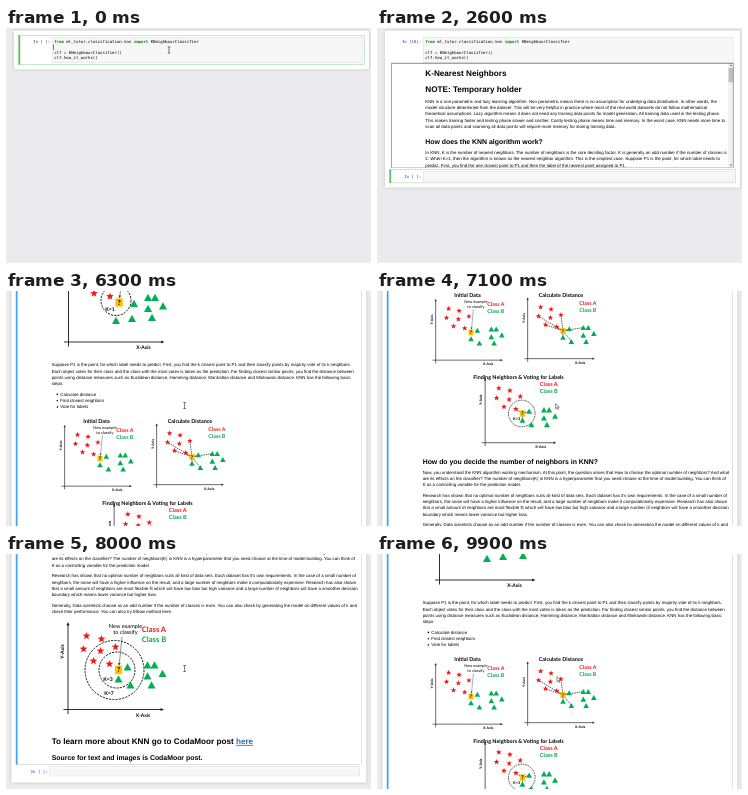
An HTML page for the animation above (10000 ms loop, 365x235 px).

```html
<!DOCTYPE html>
<html lang="en">
<head>
<meta charset="utf-8">
<title>Notebook tutorial</title>
<style>
html, body { margin: 0; width: 100%; height: 100%; overflow: hidden; background: #ebeaed; }
svg { display: block; }
text { font: 4.39px "Liberation Sans", Arial, sans-serif; text-rendering: geometricPrecision; white-space: pre; }
.h1 { font-size: 8.16px; font-weight: bold; }
.h2 { font-size: 6.91px; font-weight: bold; }
.code { font: 4px "DejaVu Sans Mono", monospace; }
.prompt { text-anchor: end; fill: #303f9f; }
.keyword { fill: #008000; font-weight: bold; }
.operator { fill: #aa22ff; font-weight: bold; }
.link { fill: #296eaa; text-decoration: underline; }
.chart { font-family: Lato, sans-serif; text-anchor: middle; }
.bold { font-weight: bold; }
.page { fill: #fff; filter: drop-shadow(0 0 1.5px rgba(87, 87, 87, .3)); }
.input { fill: #f7f7f7; stroke: #cfcfcf; stroke-width: .35; }
</style>
</head>
<body>
<svg id="stage" width="365" height="235" viewBox="0 0 365 235"></svg>
<script>
const LEFT = 48.3, SHIFT = 2.65, LINE = 6.28;
const GREEN = '#66bb6a', BLUE = '#42a5f5', GRAY = '#ababab';

const text = (x, y, str, cls = '', extra = '') => `<text x="${x}" y="${y}" class="${cls}" ${extra}>${str}</text>`;
const rect = (x, y, w, h, extra) => `<rect x="${x}" y="${y}" width="${w}" height="${h}" ${extra}/>`;
const path = (d, extra) => `<path d="${d}" ${extra}/>`;
const para = (y, str) => str.split('\n').map((line, i) => text(LEFT, y + i * LINE, line)).join('');

const INTRO = `KNN is a non parametric and lazy learning algorithm. Non parametric means there is no assumption for underlying data distribution. In other words, the model
structure determined from the dataset. This will be very helpful in practice where most of the real world datasets do not follow mathematical theoretical
assumptions. Lazy algorithm means it does not need any training data points for model generation. All training data used in the testing phase. This makes
training faster and testing phase slower and costlier. Costly testing phase means time and memory. In the worst case, KNN needs more time to scan all data
points and scanning all data points will require more memory for storing training data.`;
const HOW = `In KNN, K is the number of nearest neighbors. The number of neighbors is the core deciding factor. K is generally an odd number if the number of classes is 2.
When K=1, then the algorithm is known as the nearest neighbor algorithm. This is the simplest case. Suppose P1 is the point, for which label needs to predict.
First, you find the one closest point to P1 and then the label of the nearest point assigned to P1.`;
const STEPS = `Suppose P1 is the point, for which label needs to predict. First, you find the k closest point to P1 and then classify points by majority vote of its k neighbors.
Each object votes for their class and the class with the most votes is taken as the prediction. For finding closest similar points, you find the distance between
points using distance measures such as Euclidean distance, Hamming distance, Manhattan distance and Minkowski distance. KNN has the following basic
steps:`;
const DECIDE = `Now, you understand the KNN algorithm working mechanism. At this point, the question arises that How to choose the optimal number of neighbors? And what
are its effects on the classifier? The number of neighbors(K) in KNN is a hyperparameter that you need choose at the time of model building. You can think of
K as a controlling variable for the prediction model.`;
const RESEARCH = `Research has shown that no optimal number of neighbors suits all kind of data sets. Each dataset has it's own requirements. In the case of a small number of
neighbors, the noise will have a higher influence on the result, and a large number of neighbors make it computationally expensive. Research has also shown
that a small amount of neighbors are most flexible fit which will have low bias but high variance and a large number of neighbors will have a smoother decision
boundary which means lower variance but higher bias.`;
const GENERALLY = `Generally, Data scientists choose as an odd number if the number of classes is even. You can also check by generating the model on different values of k and
check their performance. You can also try Elbow method here.`;

// Greedy wrap for the narrower scrolling output
const meter = document.createElement('canvas').getContext('2d');
meter.font = '100px "Liberation Sans", Arial, sans-serif';
function rewrap(str, width) {
  const lines = [''];
  for (const word of str.split(/\s/)) {
    const longer = (lines.at(-1) + ' ' + word).trim();
    if (meter.measureText(longer).width * .0439 > width) lines.push(word);
    else lines[lines.length - 1] = longer;
  }
  return lines.join('\n');
}

// Notebook parts
const page = bottom => rect(8, 2.7, 355, bottom - 2.7, 'class="page"');
const frame = (top, bottom, color) =>
  rect(12.7, top, 345.7, bottom - top, `fill="none" stroke="${color === BLUE ? GRAY : color}" stroke-width=".35"`) +
  rect(12.5, top, 1.7, bottom - top, `fill="${color}"`);
const prompt = (y, str) => text(44.2, y, str, 'code prompt');
const input = (top, height) => rect(46.3, top, 310.2, height, 'class="input"');
const span = (cls, str) => `<tspan class="${cls}">${str}</tspan>`;
const codeCell = label => input(9.3, 25.5) + prompt(15.3, label) +
  text(LEFT, 15.3, `${span('keyword', 'from')} ml_tutor.classification.knn ${span('keyword', 'import')} KNeighbourClassifier`, 'code') +
  text(LEFT, 25.9, `clf ${span('operator', '=')} KNeighbourClassifier()`, 'code') +
  text(LEFT, 31.3, 'clf.how_it_works()', 'code');
const emptyCell = top => input(top + 1.9, 9.5) + prompt(top + 8.1, 'In [ ]:');
const opening = fit => text(LEFT, 47.6, 'K-Nearest Neighbors', 'h1') + text(LEFT, 64.4, 'NOTE: Temporary holder', 'h1') +
  para(74.7, fit(INTRO)) + text(LEFT, 116.1, 'How does the KNN algorithm work?', 'h2') + para(126.2, fit(HOW));

// Charts, drawn around the unknown point
const STARS = [[-32, -34], [-17, -31], [-35, -21], [-18, -19], [-3, -23], [-25, -9], [-9, -6]];
const FAR = [[29, -5], [36, -5], [29, 6], [44, 3.5], [33, 15]];
const SPREAD = [...FAR, [15, 1], [13, 16], [-3, 18]];
const NEAR = [...FAR, [9, -3], [0, 9], [12, 15]];
const CLOSEST = [STARS[6], NEAR[5], NEAR[6]];
const REACHED = [...CLOSEST, STARS[2], STARS[4], STARS[5], NEAR[0], NEAR[7]];

const star = ([x, y]) => {
  const points = Array.from({ length: 10 }, (_, i) => {
    const r = i % 2 ? 1.7 : 4.1, a = i * Math.PI / 5;
    return [x + r * Math.sin(a), y - r * Math.cos(a)].map(v => v.toFixed(2));
  });
  return path(`M${points.join('L')}Z`, 'fill="#f01818"');
};
const triangle = ([x, y]) => path(`M${x} ${y - 3.7}l4 7.2h-8z`, 'fill="#00b050"');
const label = (x, y, str, size, extra = '') => text(x, y, str, 'chart bold', `style="font-size:${size}px" ${extra}`);

function chart(x, y, scale, { triangles = NEAR, rings = [], links = [], note = false }) {
  const dashed = 'fill="none" stroke="#111" stroke-width=".95" stroke-dasharray="2.2 1.1"';
  const thin = 'stroke="#222" stroke-width=".95" fill="none"';
  let out = path('M-50.5 44V-46M-55 39.5H43', thin) +
    path('M-50.5 -48l1.6 3.4h-3.2zM45.5 39.5l-3.4 1.6v-3.2z', 'fill="#222"') +
    label(24.5, 46.5, 'X-Axis', 5) + label(0, 0, 'Y-Axis', 5, 'transform="translate(-54.5 -18.5) rotate(-90)"') +
    label(35.5, -37.8, 'Class A', 7.6, 'fill="#f01818"') + label(35.5, -27.8, 'Class B', 7.6, 'fill="#00a550"') +
    path(links.map(point => `M0 0L${point}`).join(''), dashed);
  for (const [cx, cy, r] of rings) out += `<circle cx="${cx}" cy="${cy}" r="${r}" ${dashed}/>`;
  out += STARS.map(star).join('') + triangles.map(triangle).join('');
  for (const [, , , name, lx, ly] of rings) out += label(lx, ly, name, 5.2);
  if (note) {
    out += text(7, -42.4, 'New example', 'chart', 'style="font-size:5.6px"') +
      text(7, -35.6, 'to classify', 'chart', 'style="font-size:5.6px"') +
      path('M3.5 -33L.8 -6', 'stroke="#444" stroke-width=".6"') + path('M.5 -4l-1.1 -3h2.8z', 'fill="#444"');
  }
  out += rect(-3.6, -4.2, 7.2, 8.4, 'fill="#ffc000"') + label(0, 2.4, '?', 7);
  return `<g transform="translate(${x + SHIFT} ${y}) scale(${scale})">${out}</g>`;
}

const before = page(41.3) + frame(7.4, 36.6, GREEN) + codeCell('In [ ]:') +
  rect(47.3, 16.4, .5, 5.4, 'id="caret" fill="#000"');

const boxed = page(159.6) + codeCell('In [18]:') +
  `<g clip-path="url(#output)">${opening(str => rewrap(str, 304))}` +
  rect(351.2, 34.7, 5.3, 105, 'fill="#f1f1f1"') + rect(351.5, 39.8, 4.7, 14.6, 'fill="#c1c1c1"') +
  path('M352.7 38l1.2 -1.4 1.2 1.4zM352.7 136.5l1.2 1.4 1.2 -1.4z', 'fill="#505050"') +
  rect(14.4, 35, 342.1, 105.2, 'fill="none" stroke="#000" stroke-width="1.2" opacity=".6" style="filter:blur(.5px)"') + '</g>' +
  rect(14.6, 34.9, 31.5, 104.5, 'id="hover" fill="#f0f0f0" fill-opacity=".5" stroke="#000" stroke-width=".4"') +
  frame(141.6, 154.9, GREEN) + emptyCell(141.6);

const title = (x, y, str) => label(x + SHIFT, y, str, 5.4);
const bullets = ['Calculate distance', 'Find closest neighbors', 'Vote for labels'].map((str, i) => {
  const y = 290.9 + i * LINE;
  return `<circle cx="54" cy="${y - 1.5}" r=".8"/>` + text(57, y, str);
}).join('');
const expanded = page(723.1) + frame(7.4, 705.1, BLUE) + codeCell('In [18]:') + opening(str => str) +
  chart(113, 197.5, 1, { triangles: SPREAD, note: true, rings: [[-3, -2, 15, 'K=1', -9, 8.2]] }) +
  para(261.4, STEPS) + bullets +
  title(90.5, 318, 'Initial Data') + chart(94, 353.5, .7, { note: true }) +
  title(184, 318, 'Calculate Distance') + chart(186, 352, .7, { links: REACHED }) +
  title(141.5, 400, 'Finding Neighbors &amp; Voting for Labels') +
  chart(145.5, 434.5, .74, { links: CLOSEST, rings: [[-1, 0, 18, 'K=3', -8, 8.5]] }) +
  text(LEFT, 484.5, 'How do you decide the number of neighbors in KNN?', 'h2') +
  para(494.7, DECIDE) + para(517.9, RESEARCH) + para(547.4, GENERALLY) +
  chart(112.5, 610.5, 1, { note: true, rings: [[-1.5, 0, 18, 'K=3', -10.5, 11], [-4, 0, 29.5, 'K=7', -9.5, 25]] }) +
  text(LEFT, 684.4, `To learn more about KNN go to CodaMoor post ${span('link', 'here')}`, 'h1') +
  text(LEFT, 700, 'Source for text and images is CodaMoor post.', 'h2') + emptyCell(705.1);

const ibeam = path('M-1.3 -3h2.6M0 -3V3M-1.3 3h2.6', 'id="ibeam" stroke="#222" stroke-width=".6"');
const arrow = path('M0 -2v5.2l1.2 -1.1 .9 1.9 .8 -.4 -.9 -1.8h1.6z', 'id="arrow" fill="#fff" stroke="#222" stroke-width=".5"');

document.getElementById('stage').innerHTML =
  `<clipPath id="output">${rect(14.4, 34.7, 342.1, 105, '')}</clipPath>` +
  `<g id="before">${before}</g><g id="boxed">${boxed}</g><g id="expanded">${expanded}</g><g id="mouse">${ibeam}${arrow}</g>`;

// Keyframes: time, then values
const SCROLL = [[5200, 0], [6300, 186], [7100, 312], [8000, 494.5], [8150, 518], [8400, 518], [9900, 211]];
const MOUSE = [[300, 163, 22], [800, 316, 22], [2700, 340, 146], [3800, 30, 95], [4200, 30, 95],
  [4800, 147, 111], [5200, 178.6, 114.5], [8600, 178.6, 114.5], [9900, 180, 124.5]];
function at(keys, t) {
  const next = keys.findIndex(key => key[0] > t);
  if (next < 0) return keys.at(-1).slice(1);
  if (next === 0) return keys[0].slice(1);
  const a = keys[next - 1], b = keys[next], k = (t - a[0]) / (b[0] - a[0]);
  return a.slice(1).map((v, i) => v + (b[i + 1] - v) * k);
}

const node = id => document.getElementById(id);
const show = (id, on) => node(id).setAttribute('display', on ? 'inline' : 'none');

function draw(now) {
  const t = Math.floor(now % 10000 / 100) * 100;
  const isBefore = t < 2000, isExpanded = t >= 4200 || (t >= 2000 && t < 2400);
  const [scroll] = at(SCROLL, t);
  const [x, y] = at(MOUSE, isBefore ? Math.min(t, 800) : t);
  const pointing = (t >= 2700 && t < 4300) || (scroll > 196 && scroll < 360);

  show('before', isBefore);
  show('boxed', !isBefore && !isExpanded);
  show('expanded', isExpanded);
  show('caret', t % 1000 < 500);
  show('hover', t > 2700 && x < 46);
  show('mouse', isBefore || t >= 2700);
  show('ibeam', !pointing);
  show('arrow', pointing);
  node('expanded').setAttribute('transform', `translate(${-SHIFT} ${-scroll})`);
  node('mouse').setAttribute('transform', `translate(${x} ${y})`);
  requestAnimationFrame(() => draw(performance.now()));
}
draw(performance.now());
</script>
</body>
</html>
```
